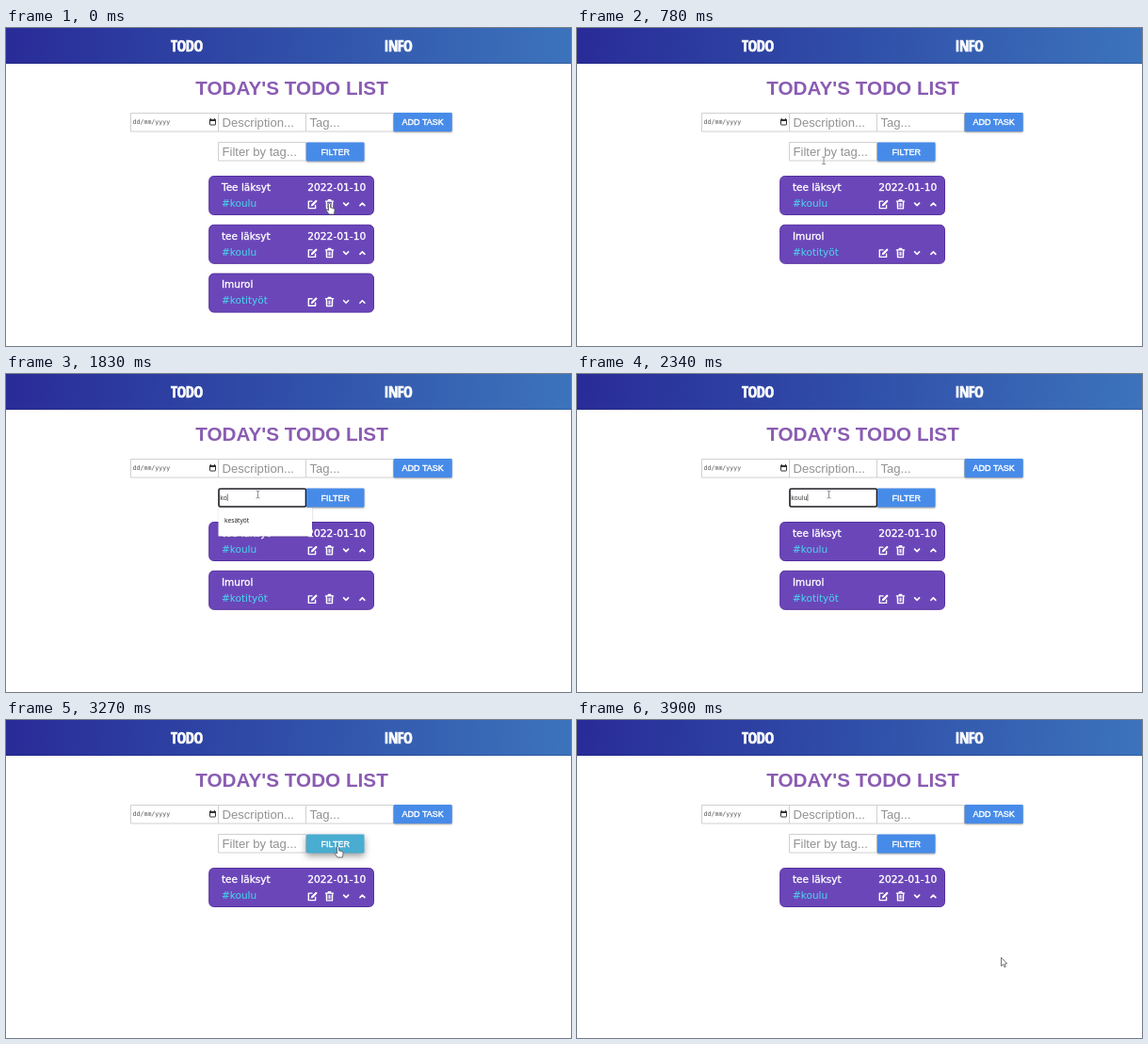
Write an HTML page with a canvas that moves like this. It is 600 by 338 pixels and loops after 4020 ms.

```html
<!DOCTYPE html>
<html lang="fi">
<head>
<meta charset="utf-8">
<title>Todo list</title>
<style>
html, body { margin: 0; width: 100%; height: 100%; overflow: hidden; background: #fff; }
canvas { display: block; width: 600px; height: 338px; }
</style>
</head>
<body>
<canvas id="stage" width="600" height="338"></canvas>
<script>
const ctx = document.getElementById('stage').getContext('2d');
const LOOP = 4020;
const SANS = '"Liberation Sans", Arial, sans-serif';
const WIDE = '"DejaVu Sans", Verdana, sans-serif';
const MONO = '"DejaVu Sans Mono", monospace';
const SMALL = '"Noto Sans", "Open Sans", sans-serif';
const NAV = 'Impact, "Noto Sans ExtraCondensed", "Open Sans Condensed", "Roboto Condensed", "Liberation Sans Narrow", Roboto, sans-serif';

const DELETE_AT = 360, FOCUS_AT = 960, FILTER_AT = 3180;
const TYPED = [[1530, 'k'], [1740, 'ko'], [1950, 'kou'], [2100, 'koul'], [2220, 'koulu']];
const MENU = [1590, 1920];
const HOVER = [2850, 3720];

// time, x, y of the pointer's hot spot
const PATH = [
  [0, 343.5, 187], [360, 343.5, 187], [600, 290, 168], [780, 262, 141], [870, 267.5, 128],
  [2430, 267.5, 128], [2610, 318, 140], [2760, 352, 142.5], [2820, 352, 142.5],
  [2940, 352.5, 135], [3660, 352.5, 135], [3780, 390, 180], [3900, 450.5, 252.5], [LOOP, 450.5, 252.5]
];

const tasks = [
  { name: 'Tee läksyt', tag: '#koulu', date: '2022-01-10' },
  { name: 'tee läksyt', tag: '#koulu', date: '2022-01-10' },
  { name: 'Imuroi', tag: '#kotityöt', date: '' }
];

const clamp = v => Math.max(0, Math.min(1, v));
const ease = v => v * v * (3 - 2 * v);

function text(str, x, y, font, color, align = 'left', weight = 0) {
  ctx.font = font;
  ctx.fillStyle = color;
  ctx.textAlign = align;
  ctx.fillText(str, x, y);
  if (weight) {
    ctx.strokeStyle = color;
    ctx.lineWidth = weight;
    ctx.strokeText(str, x, y);
  }
}

function box(x, y, w, h, r, fill, stroke, width = 1) {
  ctx.beginPath();
  ctx.roundRect(x, y, w, h, r);
  if (fill) { ctx.fillStyle = fill; ctx.fill(); }
  if (stroke) { ctx.strokeStyle = stroke; ctx.lineWidth = width; ctx.stroke(); }
}

function shadow(color, blur, dy) {
  ctx.shadowColor = color;
  ctx.shadowBlur = blur;
  ctx.shadowOffsetY = dy;
}

function lines(color, width, ...paths) {
  ctx.strokeStyle = color;
  ctx.lineWidth = width;
  ctx.beginPath();
  for (const p of paths) {
    ctx.moveTo(p[0], p[1]);
    for (let i = 2; i < p.length; i += 2) ctx.lineTo(p[i], p[i + 1]);
  }
  ctx.stroke();
}

function navbar() {
  const g = ctx.createLinearGradient(0, 0, 600, 60);
  g.addColorStop(0, '#292b98');
  g.addColorStop(0.5, '#304fa9');
  g.addColorStop(1, '#3c74bc');
  ctx.fillStyle = g;
  ctx.fillRect(0, 0, 600, 38);
  ctx.fillStyle = 'rgba(20,25,80,.25)';
  ctx.fillRect(0, 37, 600, 1);
  ctx.save();
  ctx.fontStretch = 'extra-condensed';
  ctx.letterSpacing = '-0.5px';
  text('TODO', 192, 25, '900 16.5px ' + NAV, '#fff', 'center', 0.6);
  text('INFO', 416.5, 25, '900 16.5px ' + NAV, '#fff', 'center', 0.6);
  ctx.restore();
}

function button(label, x, y, w, hover) {
  const mix = (a, b) => Math.round(a + (b - a) * hover);
  ctx.save();
  shadow('rgba(0,0,0,.4)', 2 + 5 * hover, 1 + 2 * hover);
  box(x, y, w, 20, 1, `rgb(${mix(71, 73)},${mix(139, 172)},${mix(233, 209)})`);
  ctx.restore();
  text(label, x + w / 2, y + 13, '9px ' + SANS, '#fff', 'center', 0.4);
}

function field(x, y, hint) {
  box(x + 0.5, y + 0.5, 93, 19.5, 0, '#fff', '#d0d0d0');
  text(hint, x + 4.5, y + 14.5, '13.1px ' + SANS, '#929292');
}

function calendar(x, y) {
  box(x + 0.5, y + 1.5, 6, 5.5, 0.5, null, '#333');
  ctx.fillStyle = '#333';
  ctx.fillRect(x, y + 1, 7, 2);
  ctx.fillRect(x + 1, y, 1, 2);
  ctx.fillRect(x + 5, y, 1, 2);
}

function icons(y) {
  ctx.save();
  ctx.lineCap = ctx.lineJoin = 'round';
  lines('#fff', 1.4, [325, y - 3.2, 321.3, y - 3.2, 321.3, y + 4.3, 328.6, y + 4.3, 328.6, y + 1.2]);
  lines('#fff', 2.3, [325.2, y + 0.8, 329.3, y - 3.3]);
  lines('#fff', 1, [324, y + 2, 325.2, y + 0.8]);
  lines('#fff', 1.3, [339.4, y - 3.2, 347.6, y - 3.2], [341.8, y - 3.4, 342.3, y - 4.6, 344.7, y - 4.6, 345.2, y - 3.4],
    [340.3, y - 3, 340.5, y + 4.6, 346.5, y + 4.6, 346.7, y - 3]);
  lines('#fff', 0.8, [342.1, y - 1, 342.1, y + 2.6], [343.5, y - 1, 343.5, y + 2.6], [344.9, y - 1, 344.9, y + 2.6]);
  lines('#fff', 1.6, [358.6, y - 1.2, 361.1, y + 1.3, 363.6, y - 1.2], [375.9, y + 1.3, 378.4, y - 1.2, 380.9, y + 1.3]);
  ctx.restore();
}

function card(task, y) {
  box(215.7, y + 0.5, 174.8, 41, 5, '#6b46b9', '#55309f');
  text(task.name, 229, y + 15.8, '10.5px ' + WIDE, '#fff', 'left', 0.35);
  text(task.tag, 229, y + 32.8, '10.5px ' + WIDE, '#4bcfea', 'left', 0.1);
  text(task.date, 382.3, y + 15.8, '10.7px ' + WIDE, '#fff', 'right', 0.35);
  icons(y + 30.3);
}

function filterField(t) {
  if (t < FOCUS_AT || t >= FILTER_AT) return field(225, 121, 'Filter by tag...');
  box(226, 122, 92.5, 19, 1.5, '#fff', '#1c1c24', 1.6);
  let word = '', since = FOCUS_AT;
  for (const [at, str] of TYPED) if (t >= at) { word = str; since = at; }
  text(word, 227.3, 133.5, '6.5px ' + SMALL, '#333');
  if ((t - since) % 1000 < 500) {
    const x = 227.8 + ctx.measureText(word).width;
    lines('#333', 0.7, [x, 127.5, x, 135]);
  }
}

function menu() {
  ctx.save();
  shadow('rgba(0,0,0,.25)', 2, 0.5);
  box(225.5, 142.5, 99.5, 30, 0, '#fff');
  ctx.restore();
  text('kesätyöt', 232, 158, '6.6px ' + SMALL, '#222');
}

function pointerAt(t) {
  let i = 1;
  while (i < PATH.length - 1 && t > PATH[i][0]) i++;
  const [t0, x0, y0] = PATH[i - 1], [t1, x1, y1] = PATH[i];
  const k = clamp((t - t0) / (t1 - t0));
  return [x0 + (x1 - x0) * k, y0 + (y1 - y0) * k];
}

function shape(x, y, pts) {
  ctx.beginPath();
  for (let i = 0; i < pts.length; i += 2) ctx.lineTo(x + pts[i], y + pts[i + 1]);
  ctx.closePath();
  ctx.fillStyle = '#fff';
  ctx.fill();
  ctx.strokeStyle = '#555';
  ctx.lineWidth = 0.8;
  ctx.stroke();
}

function pointer(t) {
  const [x, y] = pointerAt(t);
  const inside = (l, r, a, b) => x >= l && x <= r && y >= a && y <= b;
  if (inside(226, 318, 121, 142)) {
    lines('#777', 0.8, [x - 2, y - 4, x, y - 3.5, x + 2, y - 4], [x, y - 3.5, x, y + 3.5],
      [x - 2, y + 4, x, y + 3.5, x + 2, y + 4]);
  } else if (inside(319, 381, 121, 142) || inside(338, 349, 181, 193)) {
    shape(x, y, [-1, 0.5, 0, -0.5, 1, 0.5, 1, 3.8, 4.8, 4.8, 5.6, 6, 5, 11, -0.5, 11, -3.4, 6.8, -2.8, 5.8, -1, 7]);
  } else {
    shape(x, y, [0, 0, 0, 9, 2, 7.2, 3.4, 10.2, 4.8, 9.6, 3.5, 6.7, 6.2, 6.5]);
  }
}

function draw(t) {
  ctx.fillStyle = '#fff';
  ctx.fillRect(0, 0, 600, 338);
  navbar();
  text("TODAY'S TODO LIST", 303.5, 70.5, 'bold 20.7px ' + SANS, '#8a5cb2', 'center');

  field(132, 90, '');
  text('dd/mm/yyyy', 134.5, 101.7, '6.6px ' + MONO, '#555');
  calendar(216, 96);
  field(225, 90, 'Description...');
  field(318, 90, 'Tag...');
  button('ADD TASK', 411.7, 90, 62, 0);

  filterField(t);
  const hover = ease(clamp((t - HOVER[0]) / 200)) * (1 - ease(clamp((t - HOVER[1]) / 150)));
  button('FILTER', 319, 121.5, 61.5, hover);

  const shown = t < DELETE_AT ? tasks : t < FILTER_AT ? tasks.slice(1) : tasks.slice(1, 2);
  shown.forEach((task, i) => card(task, 157 + i * 51.8));
  if (t >= MENU[0] && t < MENU[1]) menu();
  pointer(t);
}

const start = performance.now();
function tick() {
  draw((performance.now() - start) % LOOP);
  requestAnimationFrame(tick);
}
draw(0);
requestAnimationFrame(tick);
</script>
</body>
</html>
```
